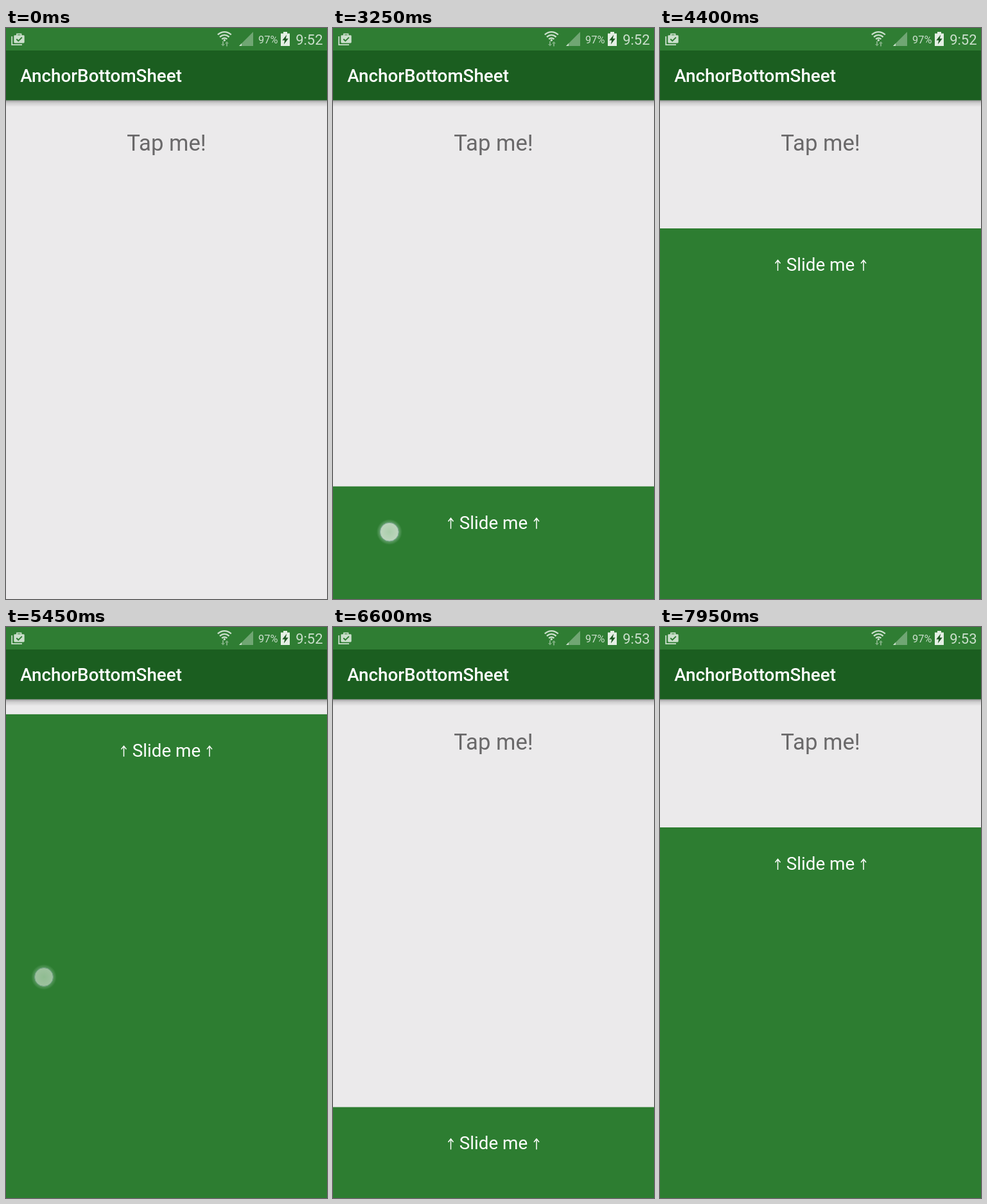
An HTML page for the animation above (8000 ms loop, 500 by 889 pixels).

```html
<!DOCTYPE html>
<html lang="en">
<head>
<meta charset="utf-8">
<title>Bottom sheet</title>
<style>
  html, body { margin: 0; width: 100%; height: 100%; overflow: hidden; background: #ebeaeb; }
  svg { display: block; width: 100%; height: 100%; font-family: Roboto, sans-serif; }
</style>
</head>
<body>
<svg viewBox="0 0 500 889">
  <defs>
    <linearGradient id="shade" x1="0" y1="0" x2="0" y2="1">
      <stop offset="0" stop-color="#000" stop-opacity=".36"/>
      <stop offset=".4" stop-color="#000" stop-opacity=".13"/>
      <stop offset="1" stop-color="#000" stop-opacity="0"/>
    </linearGradient>
    <radialGradient id="glow">
      <stop offset=".7" stop-color="#b5d5c0" stop-opacity=".42"/>
      <stop offset="1" stop-color="#b5d5c0" stop-opacity="0"/>
    </radialGradient>
    <radialGradient id="tip">
      <stop offset="0" stop-color="#aacdab"/>
      <stop offset="1" stop-color="#bdd5bd"/>
    </radialGradient>
  </defs>

  <rect width="500" height="889" fill="#ebeaeb"/>
  <text x="250" y="191" font-size="34.7" fill="#696869" text-anchor="middle">Tap me!</text>

  <g id="sheet">
    <rect width="500" height="889" fill="#2d7d31"/>
    <text x="250" y="66" font-size="27.8" fill="#fff" text-anchor="middle">Slide me</text>
    <path d="M183.5 66V49.5M179.5 54.5L183.5 49.5L187.5 54.5M317 66V49.5M313 54.5L317 49.5L321 54.5"
      fill="none" stroke="#fff" stroke-width="1.5"/>
  </g>

  <rect y="112" width="500" height="11" fill="url(#shade)"/>
  <rect y="35" width="500" height="77.5" fill="#1b5e20"/>
  <rect width="500" height="35" fill="#2f7d33"/>
  <text x="22.2" y="84" font-size="27.8" font-weight="500" fill="#fff">AnchorBottomSheet</text>

  <g fill="#cbdfcc">
    <path d="M9.2 13V26.2H25" fill="none" stroke="#cbdfcc" stroke-width="1.8"/>
    <path d="M17 12V9.3H23.5V12" fill="none" stroke="#cbdfcc" stroke-width="1.8"/>
    <rect x="12.3" y="11.3" width="16.4" height="12.2" rx="1.4"/>
    <path d="M16.3 17.2L19.3 20.2L24.9 14.6" fill="none" stroke="#2f7d33" stroke-width="2"/>

    <g fill="none" stroke="#cbdfcc" stroke-width="2.3">
      <path d="M329.8 10.3Q340.3 2 350.8 10.3M333 14Q340.3 7.8 347.6 14M336.2 17.4Q340.3 13.8 344.4 17.4"/>
    </g>
    <circle cx="340.3" cy="19" r="1.7"/>
    <path d="M337 20.5h2v4.5h2l-3 3.6l-3-3.6h2zM343 28.5h2v-4.2h2l-3-3.6l-3 3.6h2z" opacity=".5"/>

    <path d="M385 6V28H363Z" opacity=".42"/>
    <path d="M367 24V28H363Z"/>
    <text x="393" y="24" font-size="16.4">97%</text>
    <path d="M432 6h6v2.4h4V28h-14V8.4h4z" fill="#e4efe4"/>
    <path d="M437.2 10.5L430.3 19.2H434.2L432.8 25.6L439.8 16.6H435.8Z" fill="#1f5a24"/>
    <text id="clock" x="493.6" y="26" font-size="22" text-anchor="end">9:52</text>
  </g>

  <g id="dot">
    <circle r="20" fill="url(#glow)"/>
    <circle r="14.4" fill="url(#tip)" stroke="#7da596" stroke-width="1"/>
  </g>
</svg>
<script>
  const LOOP = 8000, STEP = 50, SLOP = 11, FADE = 120;
  const HIDDEN = 889, PEEK = 778, ANCHOR = 312, TOP = 112;
  const [sheet, dot, clock] = ['sheet', 'dot', 'clock'].map(id => document.getElementById(id));

  // Finger goes from a to b while pressed; the sheet then settles at rest.
  const drags = [
    { down: 3050, up: 3950, end: 4400, a: [93, 860], b: [69.7, 521], start: PEEK, rest: ANCHOR, pow: 1 },
    { down: 5250, up: 5425, end: 5650, a: [74, 713], b: [59, 545], start: ANCHOR, rest: TOP, pow: 1 },
    { down: 6100, up: 6450, end: 6800, a: [80, 454], b: [95.7, 630.4], start: TOP, rest: PEEK, pow: 2 },
    { down: 7500, up: 7700, end: 7950, a: [107, 865], b: [88, 590], start: PEEK, rest: ANCHOR, pow: 1 }
  ];

  const clamp = v => Math.min(1, Math.max(0, v));
  const mix = (a, b, p) => a + (b - a) * p;
  const settle = (a, b, t, t0, t1) => mix(b, a, (1 - clamp((t - t0) / (t1 - t0))) ** 5);

  function finger(d, t) {
    const p = clamp((t - d.down) / (d.up - d.down)) ** d.pow;
    return [mix(d.a[0], d.b[0], p), mix(d.a[1], d.b[1], p)];
  }

  function dragged(d, t) {
    const move = finger(d, t)[1] - d.a[1];
    return d.start + Math.sign(move) * Math.max(0, Math.abs(move) - SLOP);
  }

  function draw(t) {
    let y = settle(HIDDEN, PEEK, t, 1285, 1600), alpha = 0;
    const d = drags.filter(g => t >= g.down).pop();
    if (d) {
      y = settle(dragged(d, t), d.rest, t, d.up, d.end);
      alpha = 1 - clamp((t - d.up) / FADE);
      dot.setAttribute('transform', `translate(${finger(d, t).join(' ')})`);
    }
    sheet.setAttribute('transform', `translate(0 ${y})`);
    dot.setAttribute('opacity', alpha);
    clock.textContent = t < 6100 ? '9:52' : '9:53';
  }

  const begin = performance.now();
  function tick() {
    const t = (performance.now() - begin) % LOOP;
    draw(Math.floor(t / STEP) * STEP);
    requestAnimationFrame(tick);
  }
  draw(0);
  requestAnimationFrame(tick);
</script>
</body>
</html>
```
